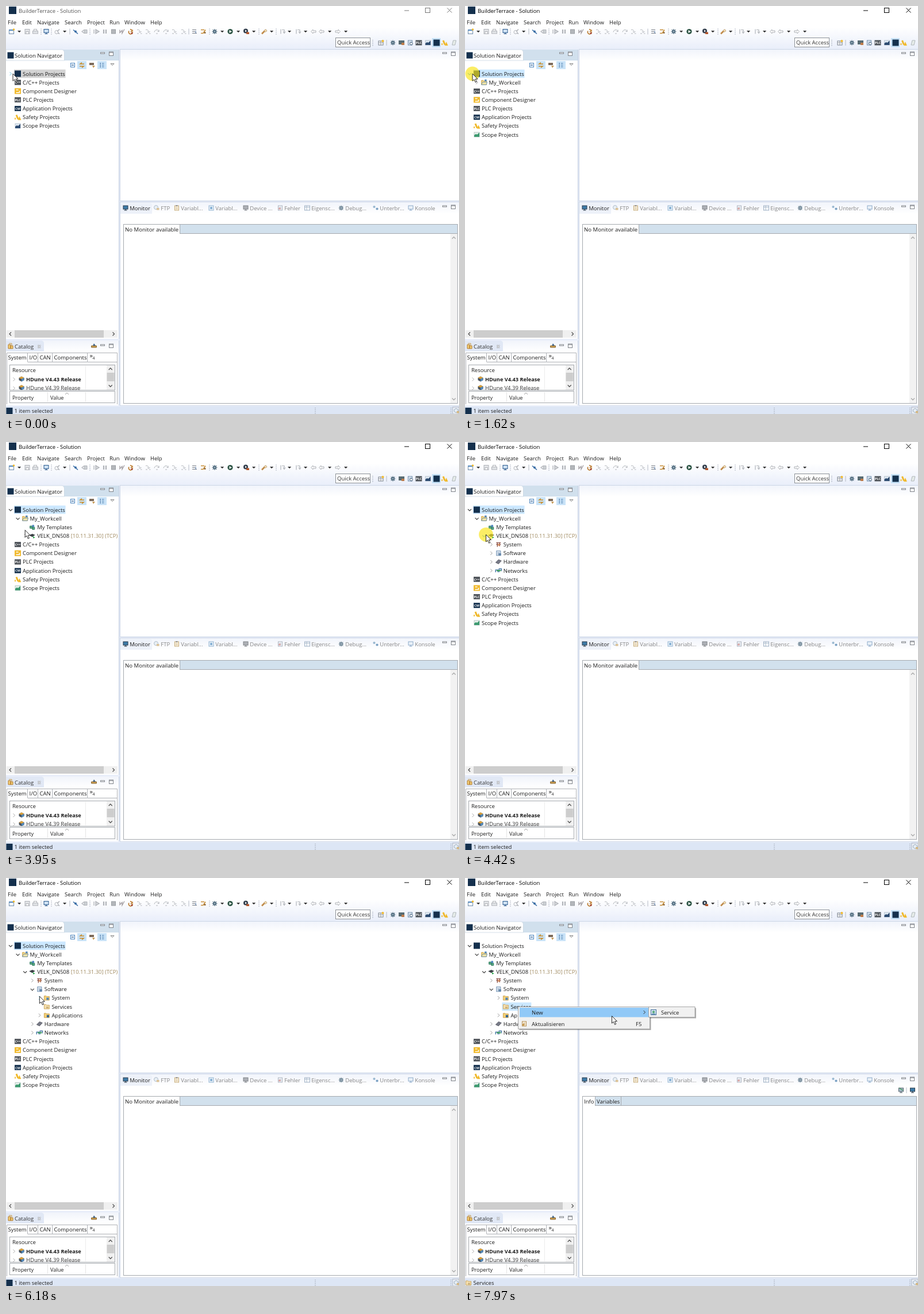
These frames come from a looping animation (788 px wide and 711 px high, 8 s). An HTML page:

```html
<!DOCTYPE html>
<html lang="en">
<head>
<meta charset="utf-8">
<title>Solution Navigator</title>
<style>
html, body { margin: 0; width: 100%; height: 100%; overflow: hidden; background: #fff; }
svg { display: block; width: 788px; height: 711px; font-family: "Open Sans", "Noto Sans", sans-serif; font-size: 9.5px; }
text { white-space: pre; }
</style>
</head>
<body>
<svg id="stage" viewBox="0 0 788 711">
  <g id="base"></g><g id="title"></g><g id="tree"></g><g id="monitor"></g><g id="status"></g><g id="menu"></g>
  <circle id="halo" r="12.4" fill="#f9e41c" opacity=".68"/>
  <path id="cursor" d="M0 0V12.6L2.9 10L5.1 15L7.2 14L5.1 9.2H9Z" fill="#fff" stroke="#111" stroke-width=".9"/>
</svg>
<script>
const LOOP = 8000;
const $ = id => document.getElementById(id);
const NAVY = '#14304d', GOLD = '#f0b92c', GREY = '#b0b3b8', INK = '#1c1c1c', BLUE = '#4f86bd', EDGE = '#a5a9ae';

const rect = (x, y, w, h, fill = 'none', stroke = 'none') =>
  `<rect x="${x}" y="${y}" width="${w}" height="${h}" fill="${fill}" stroke="${stroke}"/>`;
const path = (d, stroke = 'none', width = 1, fill = 'none') =>
  `<path d="${d}" stroke="${stroke}" stroke-width="${width}" fill="${fill}"/>`;
const dot = (x, y, r, fill, stroke = 'none') =>
  `<circle cx="${x}" cy="${y}" r="${r}" fill="${fill}" stroke="${stroke}"/>`;
const text = (x, y, s, fill = INK, more = '') => `<text x="${x}" y="${y}" fill="${fill}" ${more}>${s}</text>`;
const at = (x, y, s) => `<g transform="translate(${x} ${y})">${s}</g>`;

const badge = (s, fill) => rect(-5.5, -4.5, 11, 9, fill) +
  text(0, 2.3, s, '#fff', 'text-anchor="middle" font-size="5.6" font-weight="700"');
const folder = (fill = '#f3cf75') =>
  path('M-4.5 4V-3.5H-1L0 -2.5H4.5V4Z', '#c49a45', .8, fill);
const screen = (edge, fill) => rect(-4, -4, 8, 6, fill, edge) + path('M-2.5 4H2.5M0 2V4', edge, 1.2);
const gear = c => dot(0, 0, 2.9, c) + path('M-4.5 0H4.5M0 -4.5V4.5M-3.3 -3.3L3.3 3.3M3.3 -3.3L-3.3 3.3', c, 1.2) + dot(0, 0, 1.1, '#c3d3dc');
const page = (edge, fill) => rect(-3.5, -4, 7, 8, fill, edge) + path('M-2 -1H2M-2 1.5H2', edge, .8);
const arrow = (c, fill = '#fff') => path('M-4.5 0L-1 -3.5V-1.5H4V1.5H-1V3.5Z', c, .9, fill);

const icons = {
  solution: rect(-5.5, -5.5, 11, 11, NAVY),
  cpp: badge('C++', '#4d5258'),
  plc: badge('PLC', '#4d5258'),
  cm: badge('CM', NAVY),
  designer: rect(-5.5, -5, 11, 10, GOLD) + path('M-3 2.5H3V-.5M-3 -2H1', '#fff', 1.4),
  safety: path('M-2.5 -4L.5 3.5', GOLD, 3) + path('M-4.5 1V4M1.5 4H4.5L3 .5Z', GOLD, 1.8, GOLD),
  scope: rect(-4.5, -4, 9, 8, '#e8f2ec', '#b9c7c4') + path('M-4.5 4V1L-1.5 -1L.5 0L4.5 -3.5V4Z', 'none', 0, '#3d9a70'),
  scopeBlue: rect(-4.5, -4, 9, 8, '#dfe9f3', '#bcc6d2') + path('M-4.5 4V1L-1.5 -1L.5 0L4.5 -3.5V4Z', 'none', 0, '#2c4a70'),
  project: folder('#f6d77f') + path('M-4.5 4L-2.5 -.5H5.5L4 4Z', '#4b83bb', .8, '#fbe6a4') + rect(1, -5, 3.5, 3, BLUE),
  template: path('M-4 -2H0V2H-4ZM0 0H4V4H0Z', '#2f7b5e', 1, '#58a985') + dot(1.5, -2, 2, '#4f86bd'),
  device: path('M-5.5 -1L0 -3.5L5 -1.5L0 2Z', 'none', 0, '#3c4247') + path('M1 .5L5 3L1.5 4.5Z', 'none', 0, '#2fa64f'),
  system: path('M-4 -3H4M-4 0H4M-2 -4V4M2 -4V3', '#8a5147', 1.3) + rect(-1, -1, 3, 3, '#d98b55'),
  software: page('#6c8db0', '#e7eef5') + rect(0, 0, 4.5, 4, '#6688ab'),
  hardware: path('M-5 1L0 -4L5 -2L0 3.5Z', '#53555e', .8, '#777a87'),
  network: path('M-5 3V-1H-1V3M1 3V-3H5V1', '#4a79a6', 1.5) + path('M-3 0H4', '#3aa052', 2),
  sysFolder: folder() + rect(-.5, -.5, 4, 4, '#4d83bb'),
  svcFolder: folder('#f5dfae') + rect(-1, 0, 4, 3, '#c9b07c'),
  appFolder: folder() + rect(0, -.5, 4, 4, '#2b5f95'),
  min: rect(-3.5, -2, 7, 2, '#fff', '#80848a'),
  max: rect(-3.5, -3, 7, 6.5, '#fff', '#80848a') + path('M-3.5 -2H3.5', '#80848a', 1.2),
  down: path('M-3 -1.6H3.2L.1 1.7Z', 'none', 0, '#333'),
  sep: path('M0 -5V5', '#b4bac4', 1),
  grip: path('M0 -5V6', '#9aa2b0', 1.2).replace('<path', '<path stroke-dasharray="1.2 1.8"'),
  create: rect(-4.5, -3, 8, 7, '#fff', '#6d8cab') + path('M-4.5 -2.5H3.5', BLUE, 2) + dot(3.5, -3.5, 1.8, GOLD),
  save: rect(-4, -4, 8, 8, '#e3e5e8', GREY) + rect(-2, 0, 4, 4, '#fff', GREY),
  print: rect(-4.5, -1, 9, 4.5, '#e0e3e6', GREY) + rect(-2.5, -4, 5, 3, '#fff', GREY),
  screen: screen('#28598d', '#cfe2f3'),
  monitor: screen('#2b3b4a', '#3d7ba8'),
  wrench: dot(-1, 1, 3, 'none', GREY) + path('M0 0L4 -4M1 2L4 4', GREY, 1.6),
  skip: path('M-4 -3L4 4', '#3a6ea5', 1.6) + dot(0, 0, 2, '#3a6ea5'),
  back: path('M5 -3H0V3H5Z', GREY, 1, '#ccd0d4') + path('M0 -3L-4 0L0 3', GREY, 1.2),
  resume: path('M-4 -3.5V3.5M-1 -3.5V3.5L5 0Z', GREY, 1.3, '#d5d8db'),
  pause: path('M-2 -3.5V3.5M2 -3.5V3.5', GREY, 2.2),
  stop: rect(-3.5, -3.5, 7, 7, '#b4b7bb', '#999da2'),
  cut: path('M-4 -3V2L0 -2V3L4 -4', '#a5a0a4', 1.4),
  swirl: path('M-3 -1A3.4 3.4 0 1 0 3 0M-1 -4L3 -2L0 1', '#bb7a2c', 1.7) + dot(2, 3, 1.5, '#a23f32'),
  into: path('M-4 -3C0 -4 1 -1 1 1M-1 0L1 2L3.5 -.5M-4 3.5H-1M2 3.5H4.5', GREY, 1),
  over: path('M-4 1C-3 -4 3 -4 4 0M1.5 0H4V-3M-1 3.5H2', GREY, 1),
  lines: path('M-4 -3H3M-4 0H1M-4 3H4', '#777c84', 1.2) + path('M2 -1V3', '#5a7ea6', 1.2),
  filter: path('M-4 -3H2M-4 3H0L4 -3', '#c68d35', 1.7) + dot(3, 2, 1.5, '#8a6231'),
  bug: gear('#4e6a7d'),
  run: dot(0, 0, 4.6, '#2d5545') + path('M-1.5 -2.5V2.5L3 0Z', 'none', 0, '#fff'),
  runTool: dot(-1, -1, 4, '#333f4d') + path('M-2 -3V1L1 -1Z', 'none', 0, '#fff') + rect(0, 1, 5, 3.5, '#b3572e'),
  torch: path('M-4 4L1 -1', '#c08a48', 2.6) + path('M0 -2L3 -4L5 -1L2 1Z', '#b69a70', .8, '#f5deb0'),
  mark: path('M-3 -4V4M-1 -3H3V1M1 0L3 3L5 0', '#b0b4b9', 1.2),
  left: arrow('#a4a8ad'),
  right: `<g transform="scale(-1 1)">${arrow('#a4a8ad')}</g>`,
  perspective: rect(-4, -3, 8, 7, '#fff', '#767f89') + path('M-4 0H4M0 -3V4', '#767f89', .8) + dot(3.5, -3, 2, GOLD),
  remote: rect(-5, -4, 10, 7, '#586b72') + rect(0, 0, 5, 4, '#be7b4a'),
  search: page('#6e8aa8', '#e4edf6') + dot(2, 1.5, 2.3, '#fff', '#44617d'),
  scroll: path('M-3 4L-1 -4H4L2 4Z', '#aab2b5', .9, '#e6ece9'),
  collapse: rect(-3.5, -3.5, 7, 7, '#eef5fc', BLUE) + path('M-2 0H2', '#29588a', 1.2),
  link: path('M4 -2H-3L0 -4.5M-4 2H3L0 4.5', '#c98d28', 1.6),
  brush: rect(-5, -4, 8, 4, '#7c6a5a') + path('M0 1H5L2 5Z', 'none', 0, '#c69a58'),
  list: path('M-3.5 -3H-2M-3.5 0H-2M-3.5 3H-2', '#28598d', 1.5) + path('M0 -3H3.5M0 0H3.5M0 3H3.5', '#4478a8', 1),
  hollow: path('M-3 -2.5H3L0 .5Z', '#777', .9, '#fff'),
  ftp: dot(-1, -1, 3.5, '#e6edf3', '#9badbe') + rect(0, 0, 4.5, 3.5, '#d4b57d'),
  clip: page('#b99655', '#fbf3df') + path('M-1.5 -4H1.5', '#777', 2),
  watch: rect(-4, -4, 8, 8, '#e2edf6', '#7ba3c8') + dot(0, 0, 2, '#5a94c4'),
  probe: screen('#62666b', '#9b9fa5'),
  error: page('#9aa4b1', '#f2f5f9') + dot(-1, 1, 1.8, '#cf8986'),
  table: rect(-4.5, -4, 9, 8, '#f7f9fb', '#8aa0b8') + path('M-4.5 -1.5H4.5M-1 -4V4', '#8aa0b8', .8),
  dots: dot(-2.5, -2, 2.1, '#82a9c6') + dot(2.5, 1.5, 2.1, '#5b8bb5'),
  console: screen('#7498bd', '#e7f0f8'),
  books: path('M-4 -3H0V4H-4ZM0 -1H4V4H0Z', '#b37d2e', 1, '#f2cd74') + path('M-3 -5H2V-2', '#c99b47', 1),
  cube: path('M-4.5 -2L0 -4.5L4.5 -2V2L0 4.5L-4.5 2Z', 'none', 0, '#47525e') + path('M-4.5 -2L0 0L4.5 -2L0 -4.5Z', 'none', 0, '#dca13a') + path('M0 0V4.5L4.5 2V-2Z', 'none', 0, '#5288b8'),
  drawer: path('M-4.5 3V0H4.5V3Z', '#8d6c39', 1, '#c99d51') + path('M-2 0L0 -4L3 0Z', 'none', 0, '#3e6186'),
  monitorAdd: screen('#52616d', '#a7bfcd') + path('M-3 -4L3 0', '#45985a', 1.5),
  service: rect(-4.5, -4.5, 9, 9, '#dbe9f5', '#3d6c9b') + dot(0, -.5, 2.3, '#57a77c') + path('M-3 3H3', '#3d6c9b', 1.3),
  refresh: page('#b0894c', '#fbf4e5') + path('M-4 2L0 -1L0 4Z', 'none', 0, '#c28f3c')
};
const icon = (name, x, y) => at(x, y, icons[name]);
const row = (y, spec) => spec.split(' ').map(s => {
  const [name, ...xs] = s.split(':');
  return xs.map(x => icon(name, x, y)).join('');
}).join('');
const chevron = (x, y, dx, dy, c = '#555', w = 1.3) => dx
  ? path(`M${x - 1.5 * dx} ${y - 3}L${x + 1.5 * dx} ${y}L${x - 1.5 * dx} ${y + 3}`, c, w)
  : path(`M${x - 3} ${y - 1.5 * dy}L${x} ${y + 1.5 * dy}L${x + 3} ${y - 1.5 * dy}`, c, w);

function drawBase() {
  const menus = [[3, 'File'], [28, 'Edit'], [54, 'Navigate'], [102, 'Search'], [141, 'Project'], [180, 'Run'], [206, 'Window'], [251, 'Help']];
  const tabs = [['monitor', 208, 'Monitor'], ['ftp', 262, 'FTP'], ['clip', 297, 'Variabl...'], ['watch', 357, 'Variabl...'],
    ['probe', 417, 'Device ...'], ['error', 477, 'Fehler'], ['table', 524, 'Eigensc...'], ['bug', 583, 'Debug...'],
    ['dots', 643, 'Unterbr...'], ['console', 704, 'Konsole']];
  const cells = [[2, 'System'], [39, 'I/O'], [57, 'CAN'], [82, 'Components']];
  let s = `<defs><linearGradient id="bar" x2="0" y2="1"><stop stop-color="#fff"/><stop offset="1" stop-color="#e9eefa"/></linearGradient>
    <linearGradient id="head" x2="0" y2="1"><stop stop-color="#f1f4fb"/><stop offset="1" stop-color="#fff"/></linearGradient></defs>`;
  s += rect(0, 0, 788, 711, '#e9eefa') + rect(0, 0, 788, 37, '#fff') + rect(0, 37, 788, 38, 'url(#bar)');
  s += rect(5, 1, 13, 13, NAVY) + menus.map(([x, m]) => text(x, 32.4, m)).join('');

  s += row(44.5, 'create:10 down:23:102:376:404:431:462:493:521:563:591 save:37 print:51 grip:61:79:146:354:440:470 screen:70 wrench:89 sep:111:318 ' +
    'skip:121 back:136 resume:157 pause:172 stop:187 cut:202 swirl:217 into:232:247:293:309 over:262:278 lines:328 filter:343 ' +
    'bug:363 run:390 runTool:418 torch:449 mark:481:508 left:535:549 right:577');
  s += rect(573.5, 55.5, 60, 16, '#fff', '#8b8f94') + text(576, 67.3, 'Quick Access', '#333');
  s += rect(741, 56, 15, 16, '#c6e2f8') + row(64, 'grip:638 perspective:652 sep:662 bug:673 remote:688 search:703 plc:718 scopeBlue:734 solution:749 safety:763 scroll:779');

  // navigator
  s += rect(0, 76, 196, 504, '#fff') + rect(0, 76, 196, 19, '#d1e0ed') + path('M0 95V76H98Q101.5 77 101.5 81V95Z', '#b9cadb', .6, '#fff');
  s += path('M196.5 76V580', '#c5d0e0') + icon('solution', 8, 86) + text(15, 89.6, 'Solution Navigator', INK, 'font-size="9.6"') + row(83, 'min:168 max:183');
  s += rect(124, 96, 16, 14, '#c9e3f8') + rect(159, 96, 16, 14, '#c9e3f8') + row(103, 'collapse:116 link:132 brush:150 list:167 hollow:185');
  s += rect(1, 565, 193, 13, '#f0f0f0') + rect(15, 565, 155, 13, '#cdcdcd') + chevron(7.5, 571.5, -1, 0) + chevron(187, 571.5, 1, 0);

  // catalog
  s += rect(0, 583, 196, 113, '#fff') + rect(0, 583, 196, 19, 'url(#head)') + path('M0 602V583H62Q66 584 66 588V602Z', 'none', 0, '#e1e8f5') + path('M196.5 583V696', '#c5d0e0');
  s += icon('books', 8, 593) + text(15, 597, 'Catalog', '#333') + path('M55.5 591L60 596M60 591L55.5 596', '#9a9da3', 2) + path('M55.5 591L60 596M60 591L55.5 596', '#fff', .9);
  s += row(592, 'drawer:153 min:168 max:183');
  s += path('M1.5 694V604.5H193.5V694M141.5 620.5H193.5', EDGE, .9) + path('M37.5 605V620M55.5 605V620M80.5 605V620M141.5 605V620M37.5 620.5H141.5', EDGE, .9);
  s += cells.map(([x, c]) => text(x + 1.5, 616, c)).join('') + text(145.5, 613, '»', '#222', 'font-size="11"') + text(150.5, 616, '4', '#222', 'font-size="7"');
  s += rect(6.5, 625.5, 183, 44, '#fff', EDGE) + path('M138.5 627V668', '#ececec');
  s += '<clipPath id="clip"><rect x="7" y="626" width="182" height="43"/></clipPath><g clip-path="url(#clip)">' + text(11, 638, 'Resource');
  s += chevron(14, 650.5, 1, 0, '#aaa', 1) + icon('cube', 27, 650) + text(35, 653.7, 'HDune V4.43 Release', INK, 'font-weight="700" font-size="9.2"');
  s += chevron(14, 666, 1, 0, '#aaa', 1) + icon('cube', 27, 665) + text(35, 668.7, 'HDune V4.39 Release', '#333') + '</g>';
  s += rect(175, 626, 14, 43, '#f0f0f0') + rect(175.5, 639, 13, 15, '#cdcdcd') + chevron(181.7, 632.5, 0, -1) + chevron(181.7, 662, 0, 1);
  s += rect(6.5, 671.5, 183, 20, '#fff', EDGE) + path('M72.5 673V690M138.5 673V690', '#e4e4e4') + text(11, 685.5, 'Property', INK, 'font-size="9.2"') + text(77, 685.5, 'Value', INK, 'font-size="9.2"') + path('M103 677L106 674L109 677', '#888', .8);

  // editor and lower views
  s += rect(198.5, 75.5, 592, 264, '#fff', '#ccd6e6') + rect(199, 76, 589, 19, 'url(#head)') + row(83, 'min:763 max:778');
  s += rect(198.5, 341.5, 592, 355, '#fff', '#ccd6e6') + rect(199, 342, 589, 20, 'url(#head)') + path('M199 362V342H249Q254 343 254 347V362Z', 'none', 0, '#edf1f9');
  s += tabs.map(([n, x, label], i) => (i ? `<g opacity=".8">${icon(n, x, 352)}</g>` : icon(n, x, 352)) + text(x + 7.3, 355.8, label, i ? '#858585' : INK)).join('');
  s += row(350, 'min:763 max:778');

  s += rect(0, 698, 788, 13, '#dde6f5') + row(705, 'grip:538:774') + rect(777, 699, 11, 12, '#eef2f9', '#a9b2c0') + icon('ftp', 784, 706);
  $('base').innerHTML = s;
}

// depth, label, icon, shown from, opened at (0: no arrow)
const NEVER = Infinity;
const nodes = [
  [0, 'Solution Projects', 'solution', 0, 1620],
  [1, 'My_Workcell', 'project', 1620, 3020],
  [2, 'My Templates', 'template', 3020, 0],
  [2, 'VELK_DN508 <tspan fill="#a08a60">[10.11.31.30] (TCP)</tspan>', 'device', 3020, 4420],
  [3, 'System', 'system', 4420, NEVER],
  [3, 'Software', 'software', 4420, 5720],
  [4, 'System', 'sysFolder', 5720, NEVER],
  [4, 'Services', 'svcFolder', 5720, 0],
  [4, 'Applications', 'appFolder', 5720, NEVER],
  [3, 'Hardware', 'hardware', 4420, NEVER],
  [3, 'Networks', 'network', 4420, NEVER],
  [0, 'C/C++ Projects', 'cpp', 0, 0],
  [0, 'Component Designer', 'designer', 0, 0],
  [0, 'PLC Projects', 'plc', 0, 0],
  [0, 'Application Projects', 'cm', 0, 0],
  [0, 'Safety Projects', 'safety', 0, 0],
  [0, 'Scope Projects', 'scope', 0, 0]
];

function treeAt(t, [cx, cy]) {
  const chosen = t < 6890 ? 'Solution Projects' : 'Services';
  return nodes.filter(n => t >= n[3]).map(([depth, label, pic, , open], i) => {
    const x = depth * 12.6, y = 118 + i * 15.16;
    const hot = Math.abs(cx - x - 11) < 5 && Math.abs(cy - y) < 6;
    let s = '';
    if (label === chosen) s += rect(x + 14, y - 7.3, depth ? 51 : 89.5, 14.6, t < 920 ? '#d4d4d4' : '#cce8ff');
    if (open) s += t >= open ? chevron(x + 8, y + .5, 0, 1, hot ? '#4ab8e4' : '#444', 1.2) : chevron(x + 8, y, 1, 0, hot ? '#6cc6ea' : '#999', 1);
    return s + icon(t < 1620 && pic === 'scope' ? 'scopeBlue' : pic, x + 20.5, y) + text(x + 29, y + 3.5, label, INK, 'font-size="9.45"');
  }).join('');
}

function titleAt(active) {
  const c = active ? '#000' : '#777';
  return text(22, 11.6, 'BuilderTerrace - Solution', active ? '#000' : '#555', 'font-size="9.45"') +
    path('M693 8H701', c) + rect(729.5, 3.5, 8, 8, 'none', c) + path('M767.5 3.5L775.5 11.5M775.5 3.5L767.5 11.5', c);
}

function monitorAt(info) {
  let s = rect(204.5, 380.5, 581, 312, '#fff', EDGE) + rect(205, 381, 580, 15.5, '#d2e1ed') + path('M205 396.5H785', EDGE);
  if (info) {
    s += rect(205, 381, 21, 16, '#fff') + path('M226.5 381V396M271.5 381V396', EDGE) + text(207, 393, 'Info') + text(229, 393, 'Variables');
    return s + icon('monitorAdd', 758.5, 370) + icon('sep', 768, 370) + icon('monitor', 778.5, 370);
  }
  s += rect(205, 381, 97, 16, '#fff') + path('M302.5 381V396', EDGE) + text(207, 393, 'No Monitor available', INK, 'font-size="9.6"');
  return s + rect(773, 397, 12, 295, '#f2f2f2') + chevron(779, 404, 0, -1, '#aaa') + chevron(779, 685, 0, 1, '#aaa');
}

const statusAt = picked => icon(picked ? 'svcFolder' : 'solution', 6, 705.5) + text(14.5, 709, picked ? 'Services' : '1 item selected');

function menuAt(t) {
  if (t < 7200) return '';
  const box = (x, y, w, h) => rect(x + 2, y + 2, w, h, '#00000055') + rect(x, y, w, h, '#f1f1f1', '#a8a8a8');
  let s = box(92.5, 224.5, 229, 38.5);
  if (t >= 7360) s += rect(95, 226, 224, 16.5, '#91c9f7');
  s += text(116, 238, 'New') + chevron(312, 234, 1, 0, '#333', 1) + icon('refresh', 103, 254) + text(116, 257.7, 'Aktualisieren') + text(297, 257.7, 'F5');
  if (t >= 7740) s += box(319.5, 224.5, 80.5, 18) + icon('service', 328, 234) + text(341, 237.6, 'Service');
  return s;
}

const moves = [
  [0, 12, 118], [500, 12, 118], [610, 11.4, 117.3], [760, 12, 117.5], [1160, 12, 117.5], [1300, 13, 118],
  [1780, 13, 118], [2160, 24, 132], [3500, 24, 132], [4100, 36.2, 160.6], [4180, 36.2, 160.6], [4250, 36.5, 161.3],
  [4570, 36.5, 161.3], [5180, 49.4, 194], [5260, 50, 194.5], [6040, 50, 194.5], [6260, 63, 212.5], [6370, 63, 212.5],
  [6650, 91.5, 225], [7270, 91.5, 225], [7480, 125, 231], [7800, 215, 237], [7960, 255.5, 240.5], [LOOP, 255.5, 240.5]
];
const clicks = [[920, 1080], [1620, 1700], [3020, 3170], [4420, 4520], [5720, 5850], [6890, 6950]];

function cursorAt(t) {
  const i = moves.findIndex(m => m[0] > t);
  const [t0, x0, y0] = moves[i - 1], [t1, x1, y1] = moves[i];
  const k = (t - t0) / (t1 - t0);
  return [x0 + (x1 - x0) * k, y0 + (y1 - y0) * k];
}

const shown = {};
function put(id, html) {
  if (shown[id] !== html) $(id).innerHTML = shown[id] = html;
}

function update(t) {
  const tip = cursorAt(t), place = `translate(${tip[0]} ${tip[1]})`;
  put('title', titleAt(t >= 920));
  put('tree', treeAt(t, tip));
  put('monitor', monitorAt(t >= 7200));
  put('status', statusAt(t >= 6890));
  put('menu', menuAt(t));
  $('cursor').setAttribute('transform', place);
  $('halo').setAttribute('transform', place);
  $('halo').setAttribute('visibility', clicks.some(([a, b]) => t >= a && t < b) ? 'visible' : 'hidden');
}

drawBase();
const start = performance.now();
function frame() {
  update((performance.now() - start) % LOOP);
  requestAnimationFrame(frame);
}
frame();
</script>
</body>
</html>
```
